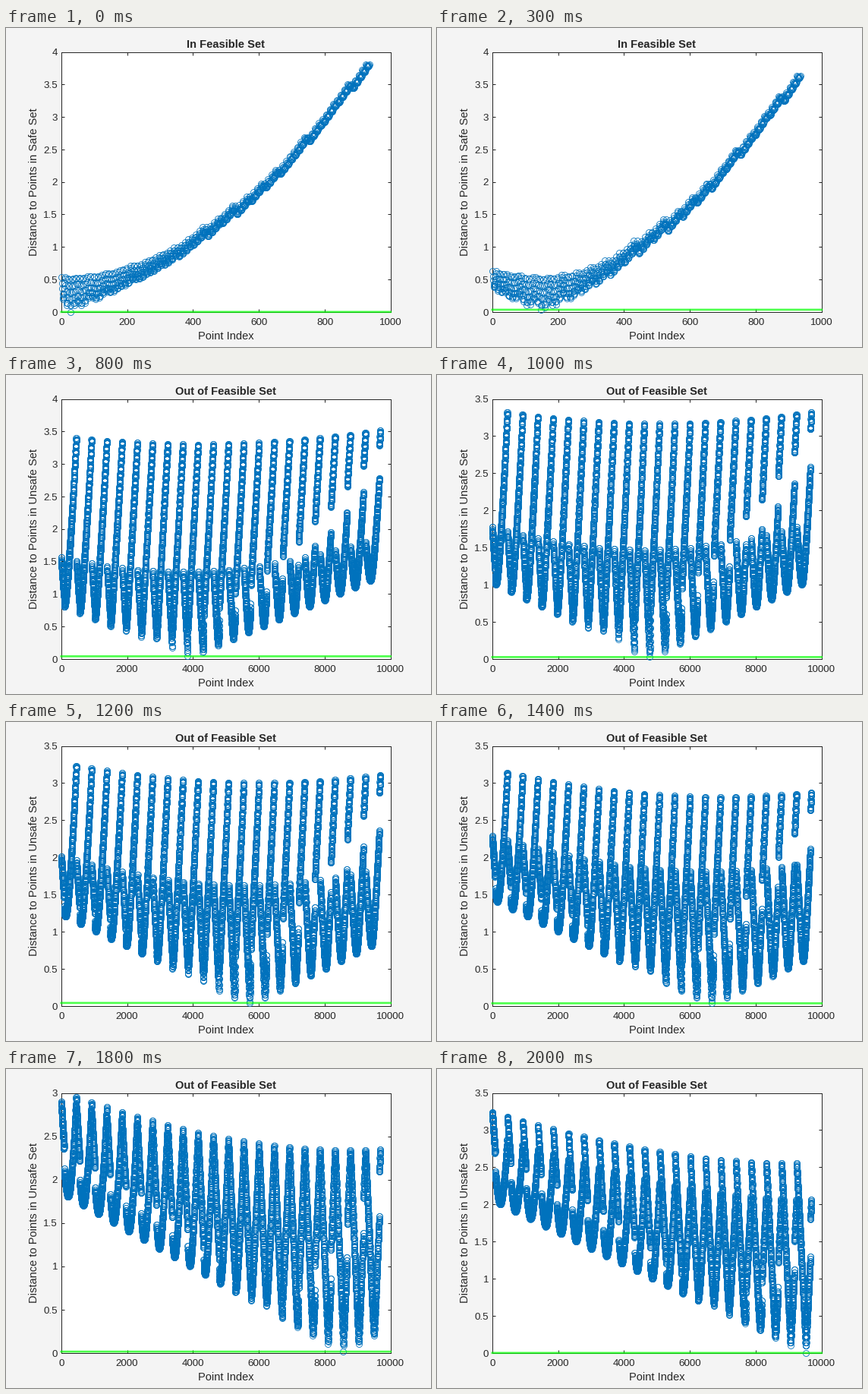
Animation, 560 px wide and 420 px high, one loop 2100 ms. Source, as a matplotlib script:

```python
import numpy as np
import matplotlib.pyplot as plt
from matplotlib.animation import FuncAnimation

W, H = 560, 420
PT = 0.72  # points per pixel at 100 dpi
LEFT, RIGHT, TOP, BOTTOM = 72.8, 506.8, 31.5, 373.8
INK = "#262626"
STEPS = 21

plt.rcParams["font.family"] = "Liberation Sans"

# Grid of states: 21 columns x 46 rows x 11 layers, spacing 0.1
col, row, layer = (a.ravel() for a in np.meshgrid(
    np.arange(STEPS), np.arange(46), np.arange(-5, 6), indexing="ij"))


def band_center(c):
    return 10 + 3 * c * c / 40


def path_row(c):
    return 10 + 3 * c * c / 80


offset = row - band_center(col)
safe = (offset >= -2) & (offset < 2 + 0.001 * col)

fig = plt.figure(figsize=(5.6, 4.2), dpi=100, facecolor="#f4f4f4")
ax = fig.add_axes([LEFT / W, 1 - BOTTOM / H,
                   (RIGHT - LEFT) / W, (BOTTOM - TOP) / H])
ax.tick_params(direction="in", length=4.3 * PT, width=PT, color=INK,
               top=True, right=True, labelleft=False, labelbottom=False)
for spine in ax.spines.values():
    spine.set(color=INK, linewidth=PT)

dots, = ax.plot([], [], "o", ms=8 * PT, mew=0.8 * PT, mfc="none",
                mec="#0072bd", clip_on=False, zorder=3)
floor = ax.axhline(0, color="#00ff00", alpha=0.7, lw=2.67 * PT,
                   clip_on=False, snap=False, zorder=4)


def label(x, y, text="", size=13.33, ha="center", **kw):
    """Text with its baseline at pixel (x, y)."""
    return fig.text(x / W, 1 - y / H, text, fontsize=size * PT, ha=ha,
                    va="baseline", color=INK, **kw)


MID = (LEFT + RIGHT) / 2
title = label(MID, 26, size=14.67, weight="bold")
label(MID, 409.5, "Point Index", 14.67)
ylabel = label(41, (TOP + BOTTOM) / 2, size=14.67, rotation=90,
               rotation_mode="anchor")
xticks = [label(LEFT + (RIGHT - LEFT) * i / 5, 391.3) for i in range(6)]
yticks = [label(68, 0, ha="right") for _ in range(9)]


def draw(i):
    p = path_row(i)
    inside = abs(p - band_center(i)) <= 2
    pick = safe if inside else ~safe
    dist = 0.1 * np.sqrt((col[pick] - i) ** 2 + (row[pick] - p) ** 2
                         + layer[pick] ** 2)
    dots.set_data(np.arange(1, dist.size + 1), dist)
    floor.set_ydata([dist.min()] * 2)

    xmax = 1000 if inside else 10000
    n = int(np.ceil(dist.max() / 0.5))
    ax.set(xlim=(0, xmax), ylim=(0, n / 2),
           xticks=np.linspace(0, xmax, 6), yticks=np.arange(n + 1) / 2)
    for k, t in enumerate(xticks):
        t.set_text(str(xmax * k // 5))
    for k, t in enumerate(yticks):
        y = BOTTOM - (BOTTOM - TOP) * k / n
        t.set_text(f"{k / 2:g}" if k <= n else "")
        t.set_y(1 - (y + 4.8) / H)

    title.set_text("In Feasible Set" if inside else "Out of Feasible Set")
    kind = "Safe" if inside else "Unsafe"
    ylabel.set_text(f"Distance to Points in {kind} Set")
    return []


anim = FuncAnimation(fig, draw, frames=STEPS, interval=100, repeat=True,
                     repeat_delay=0, blit=False)
plt.show()
```
